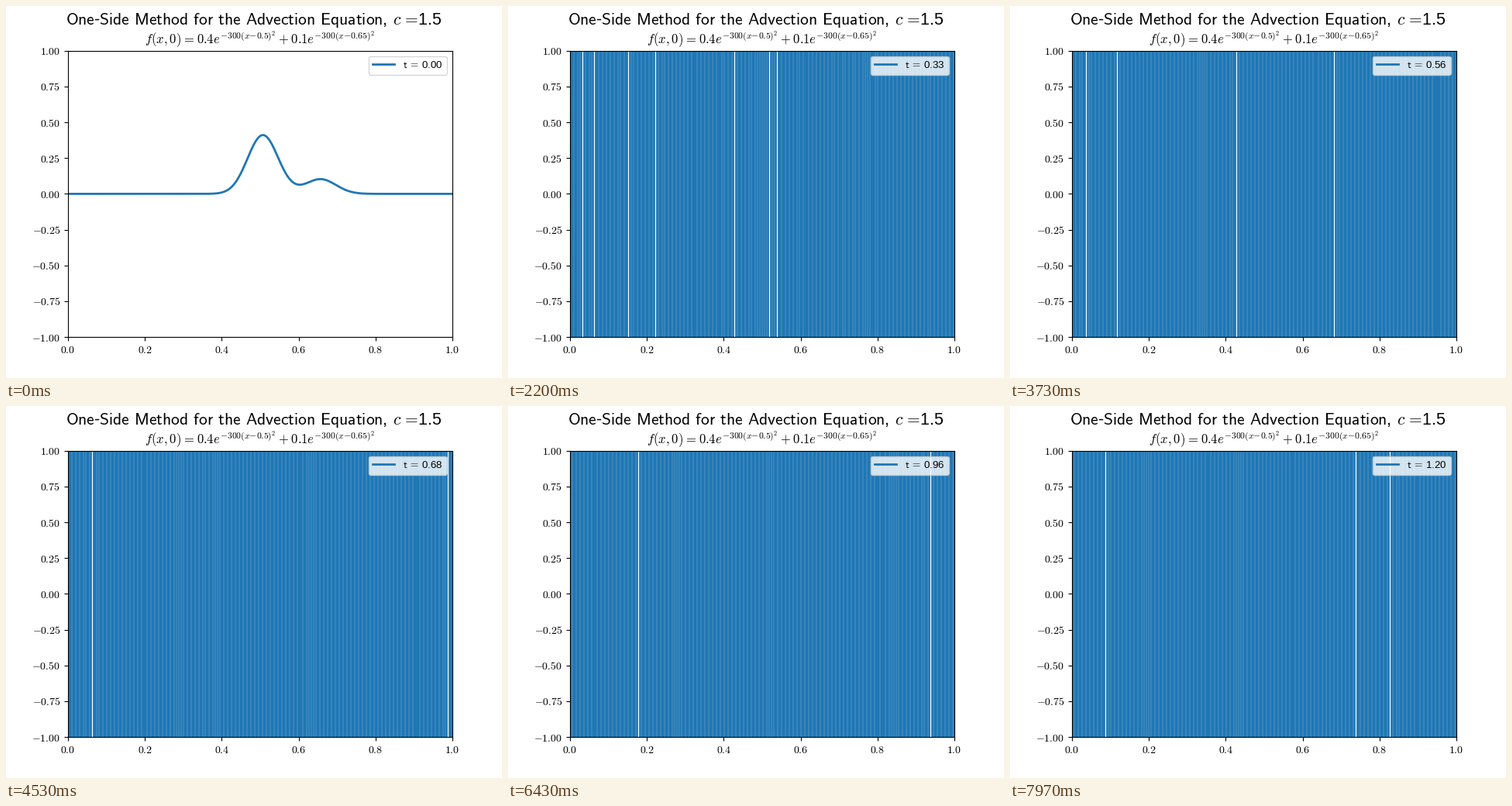
Write a matplotlib script that moves like this. It is 640 px wide and 480 px high and loops after 8.01 s.

```python
import numpy as np
import matplotlib.pyplot as plt
from matplotlib.animation import FuncAnimation

plt.rcParams.update({
    "font.family": "Liberation Sans",
    "mathtext.fontset": "cm",
})

STEPS = 240
FRAMES = STEPS + 1  # the last step is held a little longer
LOOP_MS = 8010
N = 201
C = 1.5
DX = DT = 0.005

x = np.linspace(0, 1, N)


def start():
    return 0.4 * np.exp(-300 * (x - 0.5)**2) + 0.1 * np.exp(-300 * (x - 0.65)**2)


def step(u):
    """Forward difference in space, periodic: unstable for C > 0."""
    return u - C * DT / DX * (np.roll(u, -1) - u)


def solve():
    rows, u = [], start()
    for _ in range(STEPS):
        u = step(u)
        rows.append(u)
    return rows


def sans(text):
    words = [r"\mathsf{%s}" % w for w in text.split()]
    return "$" + r"\hspace{0.38}".join(words) + "$"


def time_label(n):
    return r"$\mathsf{t}\hspace{0.2}=\hspace{0.2}$" + f"{n * DT:.2f}"


solution = solve()

fig, ax = plt.subplots(figsize=(6.4, 4.8), dpi=100)
fig.text(0.499, 1 - 24 / 480,
         sans("One") + "-" + sans("Side Method for the Advection Equation")
         + r",$\hspace{0.38}c\hspace{0.12}=\hspace{-0.2}$" + str(C),
         fontsize=15.5, ha="center", va="baseline")
ax.set_title(r"$f(x,0)\hspace{0.06}=\hspace{0.06}0.4e^{-300(x{-}0.5)^2}"
             r"+0.1e^{-300(x{-}0.65)^2}$", fontsize=12)
ax.set_xlim(0, 1)
ax.set_ylim(-1, 1)
ax.set_xticks(np.linspace(0, 1, 6))
ax.set_yticks(np.linspace(-1, 1, 9))
ax.xaxis.set_major_formatter(lambda v, _: f"${v:.1f}$")
ax.yaxis.set_major_formatter(lambda v, _: f"${v:.2f}$")

line, = ax.plot(x, solution[0], lw=2, label=time_label(0))
legend = ax.legend(loc="best")
label = legend.get_texts()[0]
label.set_fontsize(9.5)


def update(frame):
    n = min(frame, STEPS - 1)
    line.set_ydata(solution[n])
    label.set_text(time_label(n))
    return line, label


anim = FuncAnimation(fig, update, frames=FRAMES, interval=LOOP_MS / FRAMES,
                     repeat=True, repeat_delay=0)
plt.show()
```
